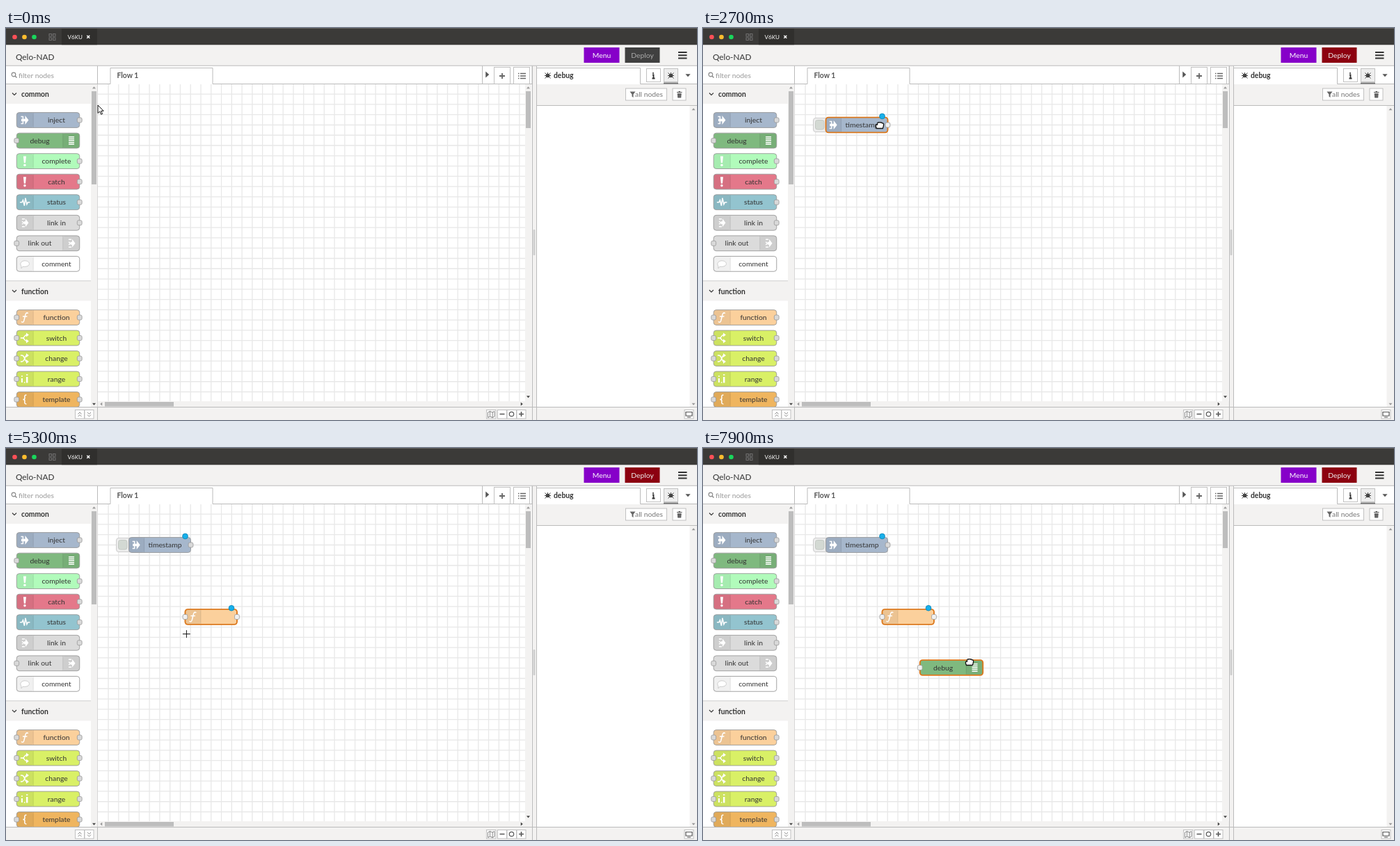
An HTML page that plays this animation: 993 by 564 pixels, repeating every 8 s.

```html
<!DOCTYPE html>
<html lang="en">
<head>
<meta charset="utf-8">
<title>Flow editor</title>
<style>
html, body { margin: 0; width: 100%; height: 100%; overflow: hidden; background: #fff; }
svg { display: block; width: 100vw; height: 100vh; }
text { font: 10.33px Lato, sans-serif; fill: #333; }
.bold { font-weight: 700; }
.mid { text-anchor: middle; }
.box { fill: none; stroke: #999; stroke-width: .9; }
.port { fill: #d9d9d9; stroke: #999; stroke-width: .8; }
.hot .box { stroke: #dc781c; stroke-width: 1.9; }
.hot .port { fill: #f0f0f0; }
.icon { fill: #fff; }
.line { fill: none; stroke: #fff; stroke-width: 1.5; }
</style>
</head>
<body>
<svg id="stage" viewBox="0 0 993 564" preserveAspectRatio="none"></svg>
<script>
const LOOP = 8000, STEP = 100, GRID = 14.77;
const PANEL = '#f3f2f1', EDGE = '#bbb', DARK = '#444';

const rect = (x, y, w, h, fill, more = '') =>
  `<rect x="${x}" y="${y}" width="${w}" height="${h}" fill="${fill}" ${more}/>`;
const path = (d, fill = 'none', stroke = 'none', w = 1) =>
  `<path d="${d}" fill="${fill}" stroke="${stroke}" stroke-width="${w}"/>`;
const text = (x, y, s, cls = '', style = '') =>
  `<text x="${x}" y="${y}" class="${cls}" style="${style}">${s}</text>`;
const circle = (x, y, r, fill, more = '') => `<circle cx="${x}" cy="${y}" r="${r}" fill="${fill}" ${more}/>`;
const group = (x, y, body, more = '') => `<g transform="translate(${x} ${y})" ${more}>${body}</g>`;
const rule = d => path(d, 'none', EDGE, 1);
const button = (x, y, w, h, fill = '#fff') => rect(x + .5, y + .5, w - 1, h - 1, fill, `stroke="${EDGE}" stroke-width=".9"`);
const tri = (x, y, turn, s = 2.5, fill = DARK) =>
  `<path transform="translate(${x} ${y}) rotate(${turn})" d="M${-s} ${s / 2}L0 ${-s / 2 - .5}L${s} ${s / 2}z" fill="${fill}"/>`;

const solid = d => `<path class="icon" d="${d}"/>`;
const line = d => `<path class="line" d="${d}"/>`;
const linkIcon = line('M-4-5.5h4M-4 5.5h4M-4-2l3 2-3 2') + solid('M-1-2h2v-4l4.5 6-4.5 6v-4h-2z');
const alertIcon = solid('M-2-7h4l-.9 9.5h-2.2z') + circle(0, 5.6, 1.7, '#fff');
const icons = {
  inject: line('M-5.5-5h3v10h-3') + solid('M-5-1.8h5.5v-4.7l5 6.5-5 6.5v-4.7h-5.5z'),
  debug: line('M-4-5.2h8M-4-2.6h8M-4 0h8M-4 2.6h8M-4 5.2h8'),
  alert: alertIcon,
  status: line('M-7 0h3l1.5-3 2 8 1.5-11 2 9 1.5-3h3'),
  link: linkIcon,
  comment: '<path d="M-3 4l-2 2.5v-3.2C-8-1-4-4.5 0-4.5S6.5-2.5 6.5 0 3.500 4.500-3 4z" fill="#fff" stroke="#ccc"/>',
  func: line('M5-6C2-8 1-5 .5-2L-1 4C-1.500 7-3 7.500-5 6M-3-1.500h6.500'),
  branch: line('M-6 0h3C0 0-1-4.500 3-4.500M-3 0C0 0-1 4.500 3 4.500') + solid('M2-7.500l4 3-4 3zM2 1.500l4 3-4 3z'),
  change: line('M-6-4.500h2C0-4.500 0 4.500 3 4.500M-6 4.500h2C0 4.500 0-4.500 3-4.500') + solid('M2-7.500l4 3-4 3zM2 1.500l4 3-4 3z'),
  range: solid('M-5-1h2v6h-2zM2-3h2.500v8.500h-2.500z') + line('M-5-4h2M2-6h2.500M-1 5h1.500'),
  brace: line('M2.500-6.500C-1-6.500 0-4 0-2S-1 0-2.500 0C-1 0 0 0 0 2S-1 6.500 2.500 6.500')
};

// Node drawn around its own centre; ports: 1 = input, 2 = output
function node({ label = '', fill, icon, ports = 0, right = false, w = 90.5, iw = 24, lx }) {
  const half = w / 2, h = 10.9, side = right ? 1 : -1;
  const shape = (cls, style = '') => `<rect x="${-half}" y="${-h}" width="${w}" height="${2 * h}" rx="3.8" class="${cls}" ${style}/>`;
  const strip = right ? half - iw : -half;
  const port = x => `<rect x="${x - 3.4}" y="-3.5" width="6.8" height="7" rx="2" class="port"/>`;
  return shape('', `fill="${fill}"`) +
    rect(strip, -h, iw, 2 * h, '#000', 'rx="3.8" opacity=".06"') +
    path(`M${side * (half - iw)} ${-h}v${2 * h}`, 'none', 'rgba(0,0,0,.12)', .8) +
    group(side * (half - iw / 2 + .3), 0, icons[icon]) + shape('box') +
    text(lx ?? -side * iw / 2, 3.6, label, 'mid') +
    (ports & 1 ? port(-half) : '') + (ports & 2 ? port(half) : '');
}

const types = [
  { label: 'inject', fill: '#a6b7cc', icon: 'inject', ports: 2 },
  { label: 'debug', fill: '#7fb97f', icon: 'debug', ports: 1, right: true },
  { label: 'complete', fill: '#b1fbbb', icon: 'alert', ports: 2 },
  { label: 'catch', fill: '#e4788a', icon: 'alert', ports: 2 },
  { label: 'status', fill: '#93c4cf', icon: 'status', ports: 2 },
  { label: 'link in', fill: '#dbdbdb', icon: 'link', ports: 2 },
  { label: 'link out', fill: '#dbdbdb', icon: 'link', ports: 1, right: true },
  { label: 'comment', fill: '#fff', icon: 'comment' },
  { label: 'function', fill: '#fbd09c', icon: 'func', ports: 3 },
  { label: 'switch', fill: '#d9f066', icon: 'branch', ports: 3 },
  { label: 'change', fill: '#d9f066', icon: 'change', ports: 3 },
  { label: 'range', fill: '#d9f066', icon: 'range', ports: 3 },
  { label: 'template', fill: '#efb55f', icon: 'brace', ports: 3 }
];
const rowY = i => i < 8 ? 132.5 + i * 29.55 : 416.5 + (i - 8) * 29.5;

function topBar() {
  let s = rect(0, 0, 993, 24.5, '#3b3a38') + rect(80, 1, 51, 23.500, '#302f2d') + rect(0, 0, 993, 1, '#605f5d');
  ['#fb4f57', '#fdbd2e', '#19d65c'].forEach((c, i) => s += circle(12.5 + i * 14, 13, 3.3, c));
  for (const x of [62, 67.5]) for (const y of [8.5, 14])
    s += rect(x, y, 3.500, 3.500, 'none', 'stroke="#777" stroke-width=".9"');
  return s + text(88.500, 15.800, 'V6KU', '', 'font-size:8.1px;fill:#fff') +
    path('M116.300 10.700l4 4m0-4l-4 4', 'none', '#fff', 1.4) +
    rect(0, 24.500, 993, 30, PANEL) + text(14, 46, 'Qelo-NAD', '', 'font-size:11.8px') +
    rect(830.500, 28, 51, 22, '#8600c9') + text(856, 43, 'Menu', 'mid', 'fill:#fff') +
    rect(889.500, 28, 50, 22, '#404040', 'id="deployBox"') + text(914.500, 43, 'Deploy', 'mid', 'fill:#aaa').replace('<text', '<text id="deployText"') +
    path('M966 35h12.500M966 39.300h12.500M966 43.600h12.500', 'none', '#333', 2);
}

function palette() {
  const head = (y, name) => rect(0, y, 122, 28, PANEL) +
    path(`M9 ${y + 12.500}l3 3 3-3`, 'none', '#333', 1.1) + text(22, y + 18, name, 'bold');
  const rows = types.map((n, i) => group(60.5, rowY(i), node(n), 'class="row"')).join('');
  return rect(0, 54, 131, 492, '#fff') +
    circle(11, 67, 2.800, 'none', 'stroke="#888" stroke-width="1.2"') + path('M13 69l2.500 2.500', 'none', '#888', 1.4) +
    text(18, 72, 'filter nodes', '', 'fill:#999') + rule('M0 80.500h131') +
    head(81, 'common') + rule('M0 364h122') + head(364.500, 'function') +
    `<clipPath id="paletteClip">${rect(0, 81, 131, 464)}</clipPath><g clip-path="url(#paletteClip)">${rows}</g>` +
    rect(122, 81, 9.500, 464, PANEL) + rect(123, 91, 7, 134, '#bdbdbd') +
    tri(126.500, 86, 0, 2.500, '#999') + tri(126.500, 541, 180);
}

function workspace() {
  let lines = '';
  for (let x = 132.300 + GRID; x < 746; x += GRID) lines += `M${x.toFixed(2)} 81V537`;
  for (let y = 80.400 + GRID; y < 537; y += GRID) lines += `M132 ${y.toFixed(2)}H746`;
  return rect(132, 54, 624, 492, '#fff') + path(lines, 'none', '#e8e8e8', 1.3) +
    rule('M131.500 54V564M132 80.500H150V57.500H297V80.500H756V54M684.500 54V80') +
    tri(691.500, 67, 90, 4.500, '#555') +
    text(159.500, 72, 'Flow 1', 'bold').replace('<text', '<text id="tab"') +
    button(701, 56, 24, 25) + path('M709 69h8M713 65v8', 'none', '#666', 1.800) +
    button(729, 56, 24, 25) + path('M739 65.500h8M739 69h8M739 72.500h8M736 65.500h1.500M736 69h1.500M736 72.500h1.500', 'none', '#666', 1.3) +
    rect(746, 81, 9.500, 456, PANEL) + rect(747, 91, 7, 53, '#bdbdbd') + tri(750.500, 86, 0, 2.500, '#999') + tri(750.500, 530.500, 180) +
    rect(132, 537, 624, 8.500, PANEL) + rect(142, 538, 99, 6.500, '#bdbdbd') + tri(137, 541, 270, 2.500, '#999') + tri(741, 541, 90);
}

function sidebar() {
  const bug = x => circle(x, 68.500, 2.800, '#444') +
    path(`M${x - 4.500} 68.500h9M${x - 4} 64.500l8 8M${x + 4} 64.500l-8 8M${x} 64v3`, 'none', '#444', 1);
  return rect(756, 54, 237, 492, '#fff') + rect(756, 54, 6, 510, PANEL) + rule('M756.500 54V545M762.500 54V545') +
    rect(757.500, 290, 3, 37, '#d0d0d0', 'rx="1"') +
    rule('M762 57.500H911.500V80.500H993') + bug(778.500) + text(787, 72, 'debug', 'bold') +
    button(920, 58, 21, 20) + path('M930 64v1.800M929 67.500h1.500v5m-2 0h4', 'none', '#333', 1.800) +
    button(945, 58, 21, 20, '#eee') + bug(955.500) + rect(945, 78.500, 21, 2, '#777') + tri(980, 68, 180, 3.600, '#555') +
    rect(763, 81, 230, 30, PANEL) + rule('M763 111.500H993') +
    button(890, 86.500, 60, 18) + path('M896.500 91.500h8l-3 4v4.500l-2-1.500v-3z', '#666') + text(904, 99.200, 'all nodes', '', 'fill:#777') +
    button(957.500, 86.500, 20, 18) + path('M964 92.500h7.500M966.500 91.500h2.500', 'none', '#555', 1.200) + path('M964.700 94h6l-.5 6.500h-5z', '#666') +
    rect(982.500, 112, 10.500, 433, PANEL) + tri(988, 117, 0, 2.500, '#999') + tri(988, 541, 180, 2.500, '#999');
}

function footer() {
  let s = rect(0, 545.500, 993, 18.500, PANEL) + rule('M0 545.500H993M131.500 545V564M756.500 545V564M762.500 545V564');
  for (const [x, w] of [[99, 14], [112.500, 14], [690, 14.500], [706, 14], [719.500, 14.500], [733.500, 14], [974.500, 14]]) s += button(x, 549, w, 13.500);
  return s + path('M103.500 555.500l2.500-2.500 2.500 2.500m-5 3.500l2.500-2.500 2.500 2.500M117 553l2.500 2.500 2.500-2.500m-5 3.500l2.500 2.500 2.500-2.500', 'none', '#888', 1) +
    path('M692.500 553l3-1.500 3.500 1.500 3-1.500v7.500l-3 1.500-3.500-1.500-3 1.500zM695.500 551.500v7.500M699 553v7.500', 'none', '#666', .8) +
    path('M709.500 555.500h7M737 555.500h7M740.500 552v7', 'none', '#555', 1.600) + circle(726.500, 555.500, 3.200, 'none', 'stroke="#555" stroke-width="1.2"') +
    path('M977 552.500h9v5.500h-9zM979 560h5', 'none', '#555', 1.200);
}

const changed = (x, y) => circle(x, y, 3.900, '#18b0ea', 'stroke="#0a83b5" stroke-width=".8"');
function flowNodes() {
  const stamp = { ...types[0], label: 'timestamp', w: 89, iw: 22, lx: 7.500 };
  const func = { ...types[8], label: '', w: 74.500, iw: 22.500 };
  const key = rect(158.500, 129.500, 20, 20, '#eee', 'rx="3.5" stroke="#ccc"') + rect(161.500, 132.500, 12.500, 13.500, '#d3d9d3', 'rx="3" stroke="#c4c9c4"');
  return `<g id="stamp">${key}${group(221, 139.500, node(stamp))}${changed(257.500, 127)}</g>` +
    `<g id="func" class="hot">${group(294.700, 243, node(func))}${changed(324, 230.300)}</g>`;
}

// Each move: first step, last step, end x, end y
const drags = [
  { type: 0, from: 900, to: 2300, moves: [[900, 1100, 103, 133], [1300, 1600, 170, 140], [1800, 1800, 206, 129], [1900, 1900, 218, 130], [2100, 2100, 220, 131]] },
  { type: 8, from: 3900, to: 5000, moves: [[3900, 3900, 53, 417], [4000, 4400, 284.500, 246.500], [4600, 4700, 295.500, 228]] },
  { type: 1, from: 6900, to: LOOP, moves: [[7100, 7100, 62, 164], [7200, 7400, 121.500, 208], [7500, 7700, 349, 284], [7900, 7900, 357, 316]] }
];
const pointer = [
  [500, 500, 126, 110], [600, 700, 76, 134], [900, 1100, 80, 137], [1300, 1600, 128, 146], [1800, 1800, 155, 139],
  [1900, 1900, 206, 141], [2100, 2100, 212, 140], [2300, 2300, 228, 146], [2700, 2700, 254, 140], [2900, 3300, 56, 421],
  [3600, 3700, 47, 421], [3900, 3900, 53, 418], [4000, 4400, 284, 255], [4600, 4700, 316, 235], [5300, 5700, 33, 398],
  [6000, 6200, 84, 279], [6300, 6500, 84, 172], [6600, 6800, 78, 163], [7100, 7100, 80, 160], [7200, 7400, 136, 195],
  [7500, 7700, 372, 278], [7900, 7900, 383, 308]
];
const shapes = [[0, 'arrow'], [700, 'hand'], [2900, 'cross'], [3200, 'arrow'], [3300, 'hand'], [5300, 'cross'], [5600, 'arrow'], [6100, 'hand']];
const hovers = [[0, -1], [700, 0], [1800, -1], [3300, 8], [4100, -1], [6100, 6], [6200, 4], [6300, 3], [6400, 2], [6500, 1], [7400, -1]];
const handles = [[0, false], [700, true], [1800, false], [3300, true], [4100, false], [6000, true], [7400, false]];

const cursors = {
  arrow: path('M0 0V11.500L2.800 9 4.700 13.300 6.600 12.500 4.700 8.300H8.200z', '#fff', '#111', 1),
  cross: path('M0-6V6M-6 0H6', 'none', '#fff', 2.600) + path('M0-5.500V5.500M-5.500 0H5.500', 'none', '#111', 1),
  hand: path('M-4.500 4.500C-5 3-6 2-5.500 0-5.200-1-4.300-1-3.500-.8V-3C-3-4.500-1.500-4.500-1-3.800-.2-4.800 1-4.600 1.500-3.700 2.300-4.300 3.300-4 3.700-3 5-3.300 5.600-2.500 5.600-1.500 5.700 1 5 2.500 4.300 4.500z', '#fff', '#111', 1.300)
};

const stage = document.getElementById('stage');
stage.innerHTML = rect(0, 0, 993, 564, PANEL) + workspace() + flowNodes() + sidebar() + palette() + footer() + topBar() + rule('M0 54.200H993') +
  `<g id="handle">${path('M132 290.500h17q3 0 3 3v32q0 3-3 3h-17z', PANEL, EDGE)}${path('M144 305.500l-4 4.500 4 4.500', 'none', '#444', 1.500)}</g>` +
  drags.map(d => `<g class="hot drag">${node(types[d.type])}</g>`).join('') +
  Object.keys(cursors).map(k => `<g id="${k}">${cursors[k]}</g>`).join('');

const $ = id => document.getElementById(id);
const rows = stage.querySelectorAll('.row'), ghosts = stage.querySelectorAll('.drag');
const show = (el, on) => el.setAttribute('visibility', on ? 'visible' : 'hidden');
const place = (el, [x, y]) => el.setAttribute('transform', `translate(${x} ${y})`);
const pick = (list, t) => list.filter(e => e[0] <= t).pop()[1];

function locate(moves, start, t) {
  let [x, y] = start;
  for (const [a, b, ex, ey] of moves) {
    if (t < a) break;
    const p = Math.min(1, (t - a + STEP) / (b - a + STEP));
    x += (ex - x) * p;
    y += (ey - y) * p;
  }
  return [x, y];
}

function draw(ms) {
  const t = Math.floor(ms % LOOP / STEP) * STEP;
  const shape = pick(shapes, t), hover = pick(hovers, t), dirty = t >= 2300;
  for (const k in cursors) show($(k), k === shape);
  place($(shape), locate(pointer, [132, 111], t));
  rows.forEach((r, i) => r.classList.toggle('hot', i === hover));
  drags.forEach((d, i) => {
    show(ghosts[i], t >= d.from && t < d.to);
    place(ghosts[i], locate(d.moves, [60.5, rowY(d.type)], t));
  });
  show($('handle'), pick(handles, t));
  show($('stamp'), dirty);
  $('stamp').setAttribute('class', t < 5000 ? 'hot' : '');
  show($('func'), t >= 5000);
  $('deployBox').setAttribute('fill', dirty ? '#8c0010' : '#404040');
  $('deployText').style.fill = dirty ? '#eee' : '#aaa';
  $('tab').style.fill = t === 1800 ? '#222' : '#555';
}

const begin = performance.now();
function tick() {
  draw(performance.now() - begin);
  requestAnimationFrame(tick);
}
tick();
</script>
</body>
</html>
```
